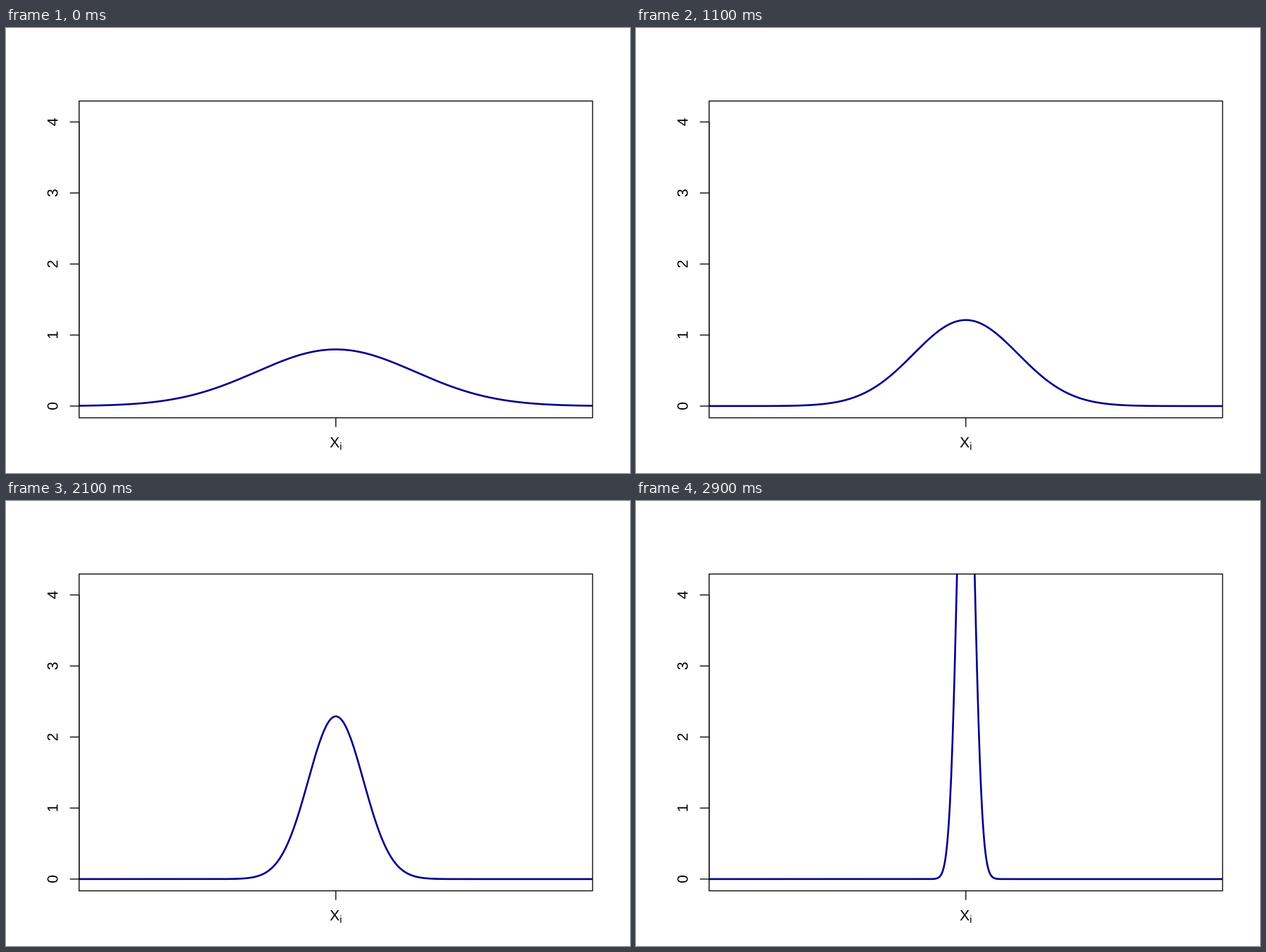
Recreate the animation shown at these times as a matplotlib script. Size 885x632 px, loop 3 s.

```python
import matplotlib.pyplot as plt
import numpy as np
from matplotlib.animation import FuncAnimation
from matplotlib.patches import PathPatch, Rectangle
from matplotlib.textpath import TextPath
from matplotlib.transforms import Affine2D

W, H, DPI = 885, 632, 128
FRAMES, INTERVAL = 30, 100

INCH = W / 7               # the layout is planned on a 7 x 5 inch page
MARGIN_LINE = 0.2 * INCH
FONT_PX = INCH / 6         # 12 pt
THIN, THICK = INCH / 96, INCH / 48
TICK = MARGIN_LINE / 2
FONT = {"family": "Liberation Sans"}

# Plot box in pixels, y pointing up
LEFT, RIGHT = 4.1 * MARGIN_LINE, W - 2.1 * MARGIN_LINE
BOTTOM, TOP = 3.1 * MARGIN_LINE, H - 4.1 * MARGIN_LINE
MID = (LEFT + RIGHT) / 2

X_MAX, Y_MAX, PAD = 1.5, 4.13, 0.04
X_UNIT = (RIGHT - LEFT) / (2 * X_MAX * (1 + 2 * PAD))
Y_UNIT = (TOP - BOTTOM) / (Y_MAX * (1 + 2 * PAD))
Y_ZERO = BOTTOM + PAD * Y_MAX * Y_UNIT

SD_START, SD_END = 0.5, 0.05

fig = plt.figure(figsize=(W / DPI, H / DPI), dpi=DPI, facecolor="white")
ax = fig.add_axes([0, 0, 1, 1])
ax.set_xlim(0, W)
ax.set_ylim(0, H)
ax.axis("off")


def points(px):
    return px * 72 / DPI


def stroke(xs, ys, color="black", width=THIN, zorder=3):
    line, = ax.plot(xs, ys, color=color, lw=points(width), zorder=zorder,
                    solid_capstyle="round", solid_joinstyle="round", snap=False)
    return line


def glyphs(x, y, text, size=FONT_PX, angle=0):
    """Draw text whose baseline starts at (x, y)."""
    place = Affine2D().rotate_deg(angle).translate(x, y)
    path = place.transform_path(TextPath((0, 0), text, size=size, prop=FONT))
    ax.add_patch(PathPatch(path, fc="black", lw=0, snap=False, zorder=3))


def draw_axes():
    stroke([LEFT, RIGHT, RIGHT, LEFT, LEFT], [BOTTOM, BOTTOM, TOP, TOP, BOTTOM])

    stroke([LEFT, LEFT], [Y_ZERO, Y_ZERO + 4 * Y_UNIT])
    digit_width = 0.556 * FONT_PX
    for value in range(5):
        y = Y_ZERO + value * Y_UNIT
        stroke([LEFT - TICK, LEFT], [y, y])
        glyphs(LEFT - 1.2 * MARGIN_LINE, y - digit_width / 2, str(value), angle=90)

    stroke([MID, MID], [BOTTOM - TICK, BOTTOM])
    sub_size = 0.7 * FONT_PX
    x_width, i_width = 0.667 * FONT_PX, 0.222 * sub_size
    x = MID - (x_width + i_width) / 2
    base = BOTTOM - 1.8 * MARGIN_LINE
    glyphs(x, base + 3.5, "X")
    glyphs(x + x_width, base, "i", size=sub_size)


def density(x, sd):
    return np.exp(-0.5 * (x / sd) ** 2) / (sd * np.sqrt(2 * np.pi))


grid = np.linspace(-2, 2, 1001)
curve = stroke([], [], color="darkblue", width=THICK, zorder=2)
curve.set_clip_path(Rectangle((LEFT, BOTTOM), RIGHT - LEFT, TOP - BOTTOM,
                              transform=ax.transData))
draw_axes()


def update(frame):
    sd = SD_START + (SD_END - SD_START) * frame / (FRAMES - 1)
    curve.set_data(MID + grid * X_UNIT, Y_ZERO + density(grid, sd) * Y_UNIT)
    return curve,


anim = FuncAnimation(fig, update, frames=FRAMES, interval=INTERVAL,
                     init_func=lambda: update(0), repeat=True, repeat_delay=0)
plt.show()
```
